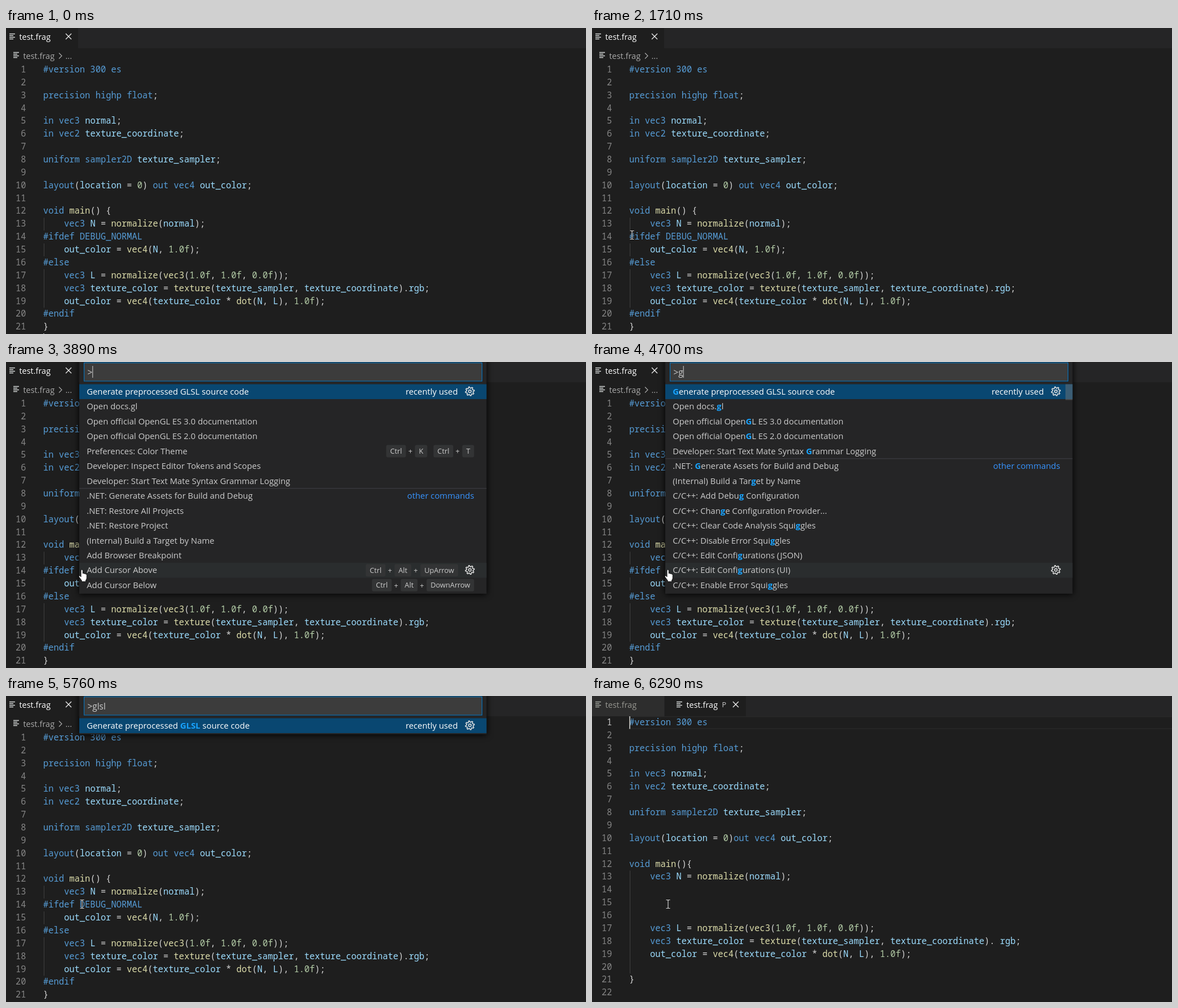
An HTML page that plays this animation: 1029x544 px, repeating every 8.16 s.

```html
<!DOCTYPE html>
<html lang="en">
<head>
<meta charset="utf-8">
<title>Shader editor</title>
<style>
  html, body { margin: 0; width: 100%; height: 100%; overflow: hidden; background: #1e1e1e; }
  svg { display: block; width: 1029px; height: 544px; overflow: hidden; }
  text { white-space: pre; font: 14.85px "Open Sans", "Noto Sans", sans-serif; fill: #ccc; }
  .code { font: 15.45px "Noto Sans Mono", "DejaVu Sans Mono", monospace; fill: #d4d4d4; }
  .num { fill: #858585; text-anchor: end; }
  .tab { font-size: 14.5px; }
  .key { font-size: 12.8px; }
  .input { font-size: 15.4px; }
  .kw { fill: #569cd6; }
  .fn { fill: #dcdcaa; }
  .id { fill: #9cdcfe; }
  .lit { fill: #b5cea8; }
  .hit { fill: #18a3ff; font-weight: 700; }
  .end { text-anchor: end; }
  .shadow { filter: drop-shadow(0 1px 6px #000); }
</style>
</head>
<body>
<svg id="stage" viewBox="0 0 1029 544" xmlns="http://www.w3.org/2000/svg"></svg>
<script>
const LOOP = 8160, LINE = 22.87, ROW = 26.46, LIST_TOP = 39.5;
const CODE_X = 66, HOVER_ROW = 12;
const UI_FONT = '"Open Sans", "Noto Sans", sans-serif';

const shader = `#version 300 es

precision highp float;

in vec3 normal;
in vec2 texture_coordinate;

uniform sampler2D texture_sampler;

layout(location = 0) out vec4 out_color;

void main() {
    vec3 N = normalize(normal);
#ifdef DEBUG_NORMAL
    out_color = vec4(N, 1.0f);
#else
    vec3 L = normalize(vec3(1.0f, 1.0f, 0.0f));
    vec3 texture_color = texture(texture_sampler, texture_coordinate).rgb;
    out_color = vec4(texture_color * dot(N, L), 1.0f);
#endif
}`.split('\n');

// The preprocessed version drops the directives and the unused branch.
const preprocessed = shader
  .map((s, i) => i === 14 || /^#(if|el|en)/.test(s) ? '' : s)
  .map(s => s.replace('0) out', '0)out').replace('() {', '(){').replace('.rgb', '. rgb'))
  .concat('');

const recent = 'Generate preprocessed GLSL source code';
const stages = [
  { at: 3890, typed: '>', split: 7, rows: [
    recent,
    'Open docs.gl',
    'Open official OpenGL ES 3.0 documentation',
    'Open official OpenGL ES 2.0 documentation',
    'Preferences: Color Theme|Ctrl+K Ctrl+T',
    'Developer: Inspect Editor Tokens and Scopes',
    'Developer: Start Text Mate Syntax Grammar Logging',
    '.NET: Generate Assets for Build and Debug',
    '.NET: Restore All Projects',
    '.NET: Restore Project',
    '(Internal) Build a Target by Name',
    'Add Browser Breakpoint',
    'Add Cursor Above|Ctrl+Alt+UpArrow',
    'Add Cursor Below|Ctrl+Alt+DownArrow'], thumb: 25, thumbAt: 4030 },
  { at: 4700, typed: '>g', split: 5, rows: [
    '*G*enerate preprocessed GLSL source code',
    'Open docs.*g*l',
    'Open official Open*G*L ES 3.0 documentation',
    'Open official Open*G*L ES 2.0 documentation',
    'Developer: Start Text Mate Syntax *G*rammar Logging',
    '.NET: *G*enerate Assets for Build and Debug',
    '(Internal) Build a Tar*g*et by Name',
    'C/C++: Add Debu*g* Configuration',
    'C/C++: Chan*g*e Configuration Provider...',
    'C/C++: Clear Code Analysis Squi*g*gles',
    'C/C++: Disable Error Squi*g*gles',
    'C/C++: Edit Confi*g*urations (JSON)',
    'C/C++: Edit Confi*g*urations (UI)',
    'C/C++: Enable Error Squi*g*gles'], thumb: 28, thumbAt: 0 },
  { at: 4900, typed: '>gl', split: 5, rows: [
    'Generate preprocessed *GL*SL source code',
    'Open docs.*gl*',
    'Open official Open*GL* ES 3.0 documentation',
    'Open official Open*GL* ES 2.0 documentation',
    'Developer: Start Text Mate Syntax *G*rammar *L*ogging',
    'C/C++: Clear Code Analysis Squig*gl*es',
    'C/C++: Disable Error Squig*gl*es',
    'C/C++: Enable Error Squig*gl*es',
    'C/C++: Tog*gl*e Inactive Region Colorization',
    'C/C++: Tog*gl*e IntelliSense Engine Fallback on Include Errors',
    'Debug: Tog*gl*e Auto Attach',
    'Debug: Tog*gl*e Breakpoint|F9',
    'Debug: Tog*gl*e Skipping this File',
    'Developer: Tog*gl*e Developer Tools|Ctrl+Shift+I'], thumb: 67.5, thumbAt: 0 },
  { at: 5030, typed: '>gls', rows: ['Generate preprocessed *GLS*L source code'] },
  { at: 5230, typed: '>glsl', rows: ['Generate preprocessed *GLSL* source code'] }
];

// time, x, y of the pointer
const path = [
  [660, 150, 540], [870, 32, 350], [940, 18, 331], [1080, 70, 350], [1220, 172, 366],
  [1290, 183, 367], [1360, 183, 367], [1430, 187, 367], [1710, 71, 368], [1780, 73, 368],
  [2200, 154, 368], [2340, 139, 370], [3210, 139, 370], [3490, 135, 370]
];
const caretFlips = [460, 940, 1430, 1990, 2470, 3000, 3490];

const pen = document.createElement('canvas').getContext('2d');
function widthOf(s, size) {
  pen.font = `${size}px ${UI_FONT}`;
  return pen.measureText(s).width;
}

const esc = s => s.replace(/&/g, '&amp;').replace(/</g, '&lt;').replace(/>/g, '&gt;');
// Baselines sit on whole pixels.
const text = (x, y, body, cls = '', fill = '') =>
  `<text x="${x}" y="${Math.round(y)}" class="${cls}"${fill && ` style="fill:${fill}"`}>${body}</text>`;
const rect = (x, y, w, h, fill, extra = '') =>
  `<rect x="${x}" y="${y}" width="${w}" height="${h}" fill="${fill}" ${extra}/>`;
const stroke = (d, color, w = 1.2) =>
  `<path d="${d}" fill="none" stroke="${color}" stroke-width="${w}"/>`;
const group = (id, body) => `<g id="${id}">${body}</g>`;

const keywords = /^(precision|highp|float|in|out|uniform|sampler2D|layout|void|vec[234])$/;
function paint(line) {
  const span = (cls, s) => `<tspan class="${cls}">${esc(s)}</tspan>`;
  if (line[0] === '#') return span('kw', line);
  return line.replace(/\d+(\.\d+f)?|[A-Za-z_]\w*/g, (word, _, at) => {
    const call = line[at + word.length] === '(';
    if (/^\d/.test(word)) return span('lit', word);
    if (call && word !== 'layout') return span('fn', word);
    return span(keywords.test(word) ? 'kw' : 'id', word);
  });
}

function editor(lines, top, active) {
  return lines.map((line, i) => {
    const y = top + i * LINE + 16.1;
    return text(35.6, y, i + 1, 'code num', i === active ? '#c6c6c6' : '') +
      text(CODE_X, y, paint(line), 'code');
  }).join('');
}

const guide = (top, from, to) =>
  rect(67, top + (from - 1) * LINE, 1, (to - from + 1) * LINE, '#404040');

const fileIcon = (x, y, color) =>
  stroke(`M${x} ${y}h10m-10 3h7m-7 3h10m-10 3h7`, color, 1.3);
const cross = (x, y) =>
  stroke(`M${x - 5} ${y - 5}l10 10m0 -10l-10 10`, '#e8e8e8', 1.4);

function gear(x, y) {
  const pts = [];
  for (let i = 0; i < 32; i++) {
    const a = (i - 1.5) * Math.PI / 16, r = i % 4 < 2 ? 7.9 : 5.7;
    pts.push(`${x + r * Math.sin(a)},${y - r * Math.cos(a)}`);
  }
  return `<g fill="none" stroke="#e4e4e4" stroke-width="1.5"><polygon points="${pts.join(' ')}"/>` +
    `<circle cx="${x}" cy="${y}" r="2.3"/></g>`;
}

// Key caps are laid out from the right edge to the left.
function keyCaps(chords, right, y) {
  let x = right, out = '';
  chords.split(' ').reverse().forEach((chord, c) => {
    if (c) x -= 11;
    chord.split('+').reverse().forEach((key, k) => {
      if (k) {
        out += text(x - 11.8, y + 4.8, '+', 'key');
        x -= 16;
      }
      const w = widthOf(key, 12.8) + 14;
      x -= w;
      out += rect(x, y - 11, w, 22, '#333435', 'rx="3"') + text(x + 7, y + 4.6, key, 'key');
    });
  });
  return out;
}

function palette({ typed, split, rows, thumb }, n) {
  const bottom = LIST_TOP + rows.length * ROW + 2;
  let out = rect(130, -8, 722.5, bottom + 8, '#252526', 'class="shadow"') +
    rect(138.5, 1.5, 706, 32.5, '#3c3c3c', 'stroke="#0078c8"') +
    text(144.5, 24, esc(typed), 'input') +
    rect(130, LIST_TOP, 722.5, ROW, '#094771');
  if (rows.length > HOVER_ROW)
    out += rect(130, LIST_TOP + HOVER_ROW * ROW, 722.5, ROW, '#2a2d2e');
  rows.forEach((row, i) => {
    const [label, keys] = row.split('|');
    const mid = LIST_TOP + (i + .5) * ROW, base = mid + 5.2;
    const hover = i === HOVER_ROW;
    const body = label.split('*')
      .map((s, k) => k % 2 ? `<tspan class="hit">${s}</tspan>` : s).join('');
    out += text(143.2, base, body, '', i ? '' : '#fff');
    if (!i) out += text(801.5, base, 'recently used', 'end', '#fff');
    if (i === split)
      out += rect(130, mid - ROW / 2 - .5, 722.5, 1, '#3f3f46') +
        text(830.5, base, 'other commands', 'end', '#3794ff');
    if (!i || hover) out += gear(823, mid - .6);
    if (keys) out += keyCaps(keys, hover ? 802 : 830.5, mid);
  });
  if (thumb) out += rect(840, LIST_TOP, 12.5, thumb, '#797979', `id="thumb${n}" opacity=".45"`);
  out += rect(144.5 + widthOf(typed, 15.4), 7, 1, 21, '#d4d4d4', `id="inputCaret${n}"`);
  return group('palette' + n, out);
}

const TOP_A = 62.8, TOP_B = 35.9;
const viewA = rect(0, 0, 1029, 36, '#252526') + rect(0, 0, 128, 36, '#1e1e1e') +
  fileIcon(6, 10.5, '#d4d7d6') + text(23.4, 21, 'test.frag', 'tab', '#fff') + cross(111, 15) +
  fileIcon(13, 43.5, '#d4d7d6') + text(30.4, 55, 'test.frag', 'tab', '#a9a9a9') +
  stroke('M94 44.5l5 5l-5 5', '#a9a9a9') + text(105.5, 55, '...', 'tab', '#a9a9a9') +
  guide(TOP_A, 13, 13) + guide(TOP_A, 15, 15) + guide(TOP_A, 17, 19) +
  editor(shader, TOP_A) + rect(CODE_X, 543, 2, 1, '#aeafad', 'id="caret"');

const viewB = rect(0, 0, 1029, 36, '#252526') + rect(0, 0, 128, 36, '#2d2d2d') +
  rect(129, 0, 144, 36, '#1e1e1e') +
  fileIcon(6, 10.5, '#a0a39c') + text(23.4, 21, 'test.frag', 'tab', '#969690') +
  fileIcon(150, 10.5, '#d4d7d6') + text(167.4, 21, 'test.frag', 'tab', '#fff') +
  text(230.5, 20, 'P', 'key') + cross(255, 15) +
  rect(64, 36, 965, 1.5, '#282828') + rect(64, 57.3, 965, 1.5, '#282828') +
  guide(TOP_B, 13, 20) + editor(preprocessed, TOP_B, 0) +
  rect(CODE_X, 36, 2, 22.5, '#aeafad');

const beamPath = 'M-3.5 -7.5h2.5l1 1l1 -1h2.5M0 -6.5v13M-3.5 7.5h2.5l1 -1l1 1h2.5';
const beam = stroke(beamPath, '#1e1e1e', 2.4) + stroke(beamPath, '#dcdcdc', 1.1);
const arrow = '<path d="M0 0v16l-3.6 -3.4l-2.6 6l-2.6 -1.1l2.6 -5.8h-5z" fill="#fff" stroke="#000"/>';
const hand = '<path d="M-2 1q0 -2 1.6 -2q1.7 0 1.7 2v5q1.3 -1.2 2.6 .4q1.4 -.9 2.4 .7' +
  'q2 -.5 2 1.6v5.3q0 2.4 -1.7 4v2.4h-7.4v-2l-4.7 -6.2q-1 -1.7 .3 -2.3q1.5 -.5 3.2 2z" ' +
  'fill="#fff" stroke="#000" stroke-width=".9"/>';

const stage = document.getElementById('stage');
stage.innerHTML = rect(0, 0, 1029, 544, '#1e1e1e') +
  group('viewA', viewA) + group('viewB', viewB) + stages.map(palette).join('') +
  group('pointer', group('beam', beam) + group('arrow', arrow) + group('hand', hand));

const parts = {};
stage.querySelectorAll('[id]').forEach(el => parts[el.id] = el);
const show = (id, on) => parts[id].style.display = on ? '' : 'none';

function pointerAt(t) {
  const base = t < 3000 ? 660 : 3280;
  const q = base + Math.floor((t - base) / 70) * 70;
  const i = path.findIndex(p => p[0] > q);
  if (i < 0) return path[path.length - 1].slice(1);
  if (!i) return path[0].slice(1);
  const [t0, x0, y0] = path[i - 1], [t1, x1, y1] = path[i];
  const k = (q - t0) / (t1 - t0);
  return [x0 + (x1 - x0) * k, y0 + (y1 - y0) * k];
}

function draw(t) {
  const open = t >= 3890 && t < 6160;
  const now = open ? stages.filter(s => s.at <= t).length - 1 : -1;
  const inputCaret = !(t >= 4490 && t < 4700) && t < 5760;
  stages.forEach((s, i) => {
    show('palette' + i, i === now);
    show('inputCaret' + i, inputCaret);
    if (s.thumb) show('thumb' + i, t >= s.thumbAt);
  });

  show('viewA', t < 6290);
  show('viewB', t >= 6290);
  const flips = caretFlips.filter(f => f <= t).length;
  show('caret', !open && (t >= 6160 || flips % 2 === 0));

  const [x, y] = pointerAt(t);
  const overList = t >= 3890 && t < 5100;
  const gutter = x < 62;
  show('pointer', t >= 660);
  show('hand', overList);
  show('arrow', !overList && gutter);
  show('beam', !overList && !gutter);
  parts.pointer.setAttribute('transform', `translate(${x} ${y})`);
}

function tick() {
  draw(performance.now() % LOOP);
  requestAnimationFrame(tick);
}
tick();
</script>
</body>
</html>
```
